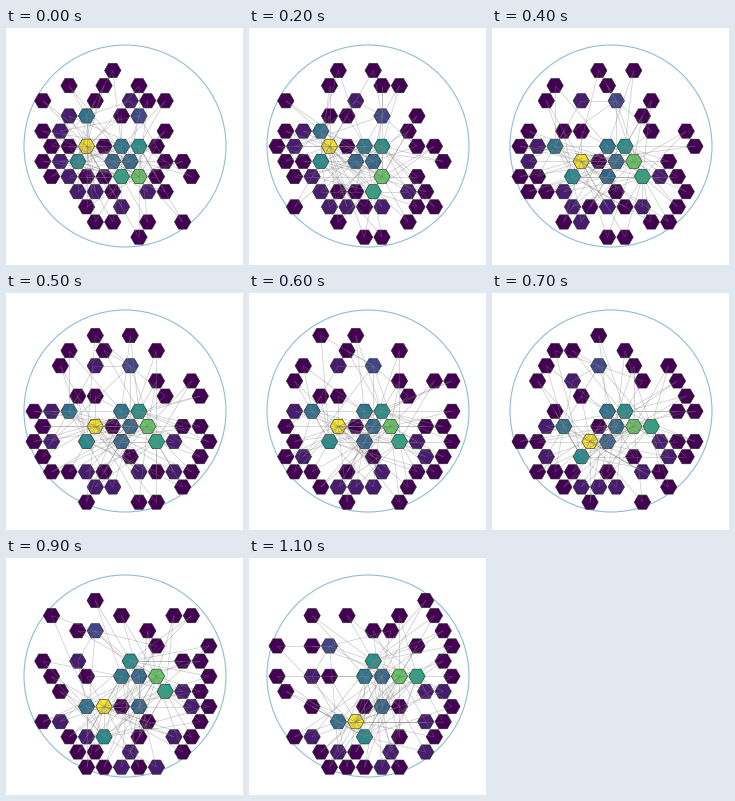
A matplotlib script that plays this animation: 237 px wide and 237 px high, repeating every 1200 ms.

```python
import matplotlib.pyplot as plt
import numpy as np
from matplotlib.animation import FuncAnimation
from matplotlib.collections import LineCollection, PolyCollection

SIZE, DPI = 237, 100
FRAMES, INTERVAL = 12, 100
CENTER, RADIUS = 119 + 118j, 101
HALF_COL, ROW = 8.74, 15.15
TURN = -0.12  # radians per frame
HUBS = 11
PX = 72 / DPI

# Cells are row * 100 + half column; hubs come first, in a fixed order.
START = [506, 712, 710, 512, 605, 306, 510, 609, 611, 312, 508,
         9, 104, 108, 112, 201, 207, 211, 213, 215, 304, 310, 401, 403, 415,
         502, 504, 514, 601, 603, 615, 617, 702, 704, 706, 708, 714, 718,
         805, 807, 809, 813, 815, 906, 910, 1007, 1009, 1013, 1017, 1112]
MIDDLE = [607, 613, 714, 512, 706, 504, 510, 710, 611, 211, 609,
          7, 11, 104, 108, 114, 203, 207, 314, 318, 405, 407, 415, 419,
          500, 502, 601, 617, 619, 700, 702, 716, 720, 801, 811, 819,
          902, 904, 906, 908, 912, 914, 916, 918, 1007, 1009, 1017,
          1106, 1112, 1114]
END = [809, 514, 516, 411, 910, 807, 510, 712, 512, 306, 710,
       17, 104, 108, 114, 118, 211, 213, 219, 300, 304, 316, 320, 419,
       500, 504, 506, 520, 601, 617, 619, 704, 714, 720, 817, 819,
       902, 904, 914, 918, 1005, 1007, 1009, 1013, 1017,
       1106, 1108, 1110, 1112, 1114]
MID_FRAME, LAST_FRAME = 5, FRAMES - 1
HUB_LEVELS = [1, .76, .6, .51, .48, .37, .39, .31, .33, .21, 0]
BUSY_LEAVES = {211, 304, 403, 603, 704, 805, 807, 813, 910}


def place(cells):
    """Offsets of cells from the centre, as complex numbers."""
    row, col = np.divmod(cells, 100)
    return 28.1 + HALF_COL * col + 1j * (42.5 + ROW * row) - CENTER


def match(a, b, angle):
    """Reorder the leaves of b to follow those of a turned by angle."""
    a, b = a * np.exp(1j * angle), b.copy()
    improved = True
    while improved:
        improved = False
        for i in range(HUBS, len(a)):
            for j in range(i + 1, len(a)):
                kept = abs(a[i] - b[i]) ** 2 + abs(a[j] - b[j]) ** 2
                swapped = abs(a[i] - b[j]) ** 2 + abs(a[j] - b[i]) ** 2
                if swapped < kept - 1e-6:
                    b[i], b[j] = b[j], b[i]
                    improved = True
    return b


def blend(a, b, t, angle):
    """Move from a to b along a turning path."""
    return np.exp(1j * angle * t) * ((1 - t) * a + t * b * np.exp(-1j * angle))


def snap(points):
    """Put each point on the nearest free cell."""
    free = GRID.copy()
    out = np.empty_like(points)
    for i, p in enumerate(points):
        k = np.argmin(abs(free - p))
        out[i] = free[k]
        free[k] = 1e6
    return out


def layout(frame):
    if frame <= MID_FRAME:
        a, b, first, last = start, middle, 0, MID_FRAME
    else:
        a, b, first, last = middle, end, MID_FRAME, LAST_FRAME
    t = (frame - first) / (last - first)
    return snap(blend(a, b, t, TURN * (last - first)))


def make_edges(rng):
    """Preferential attachment: two links per node, mostly to close hubs."""
    links = [(0, 1)]
    pull = np.array(HUB_LEVELS) + 0.06
    pull[-1] = 0.01
    for i in range(2, len(start)):
        n = min(i, HUBS)
        gap = abs(start[:n] - start[i]) + abs(end[:n] - end[i])
        weight = pull[:n] * np.exp(-gap / 110)
        picks = rng.choice(n, 2, replace=False, p=weight / weight.sum())
        links += [(i, int(k)) for k in picks]
    return links


def xy(z):
    return np.stack([z.real, z.imag], axis=-1)


GRID = place(np.array([100 * r + c for r in range(12)
                       for c in range(1 - r % 2, 21, 2)]))
GRID = GRID[abs(GRID) < 99.5]

start = place(np.array(START))
middle = match(start, place(np.array(MIDDLE)), TURN * MID_FRAME)
end = match(middle, place(np.array(END)), TURN * (LAST_FRAME - MID_FRAME))
edges = np.array(make_edges(np.random.default_rng(4)))
levels = HUB_LEVELS + [.08 if c in BUSY_LEAVES else 0 for c in START[HUBS:]]
hexagon = 8.2 * np.exp(1j * np.pi / 3 * np.arange(6))

fig = plt.figure(figsize=(SIZE / DPI, SIZE / DPI), dpi=DPI, facecolor="white")
ax = fig.add_axes([0, 0, 1, 1])
ax.set(xlim=(0, SIZE), ylim=(SIZE, 0))
ax.axis("off")
ax.add_patch(plt.Circle((CENTER.real, CENTER.imag), RADIUS, fill=False,
                        ec="tab:blue", alpha=.5, lw=1.1 * PX))
nodes = PolyCollection([], facecolors=plt.cm.viridis(levels),
                       edgecolors="#222222", linewidths=.6 * PX, zorder=2)
lines = LineCollection([], colors="gray", alpha=.4, linewidths=.75 * PX,
                       zorder=3)
ax.add_collection(nodes)
ax.add_collection(lines)


def draw(frame):
    z = layout(frame) + CENTER
    nodes.set_verts(xy(z[:, None] + hexagon))
    lines.set_segments(xy(z[edges]))
    return nodes, lines


anim = FuncAnimation(fig, draw, frames=FRAMES, interval=INTERVAL,
                     repeat=True, repeat_delay=0)
plt.show()
```
